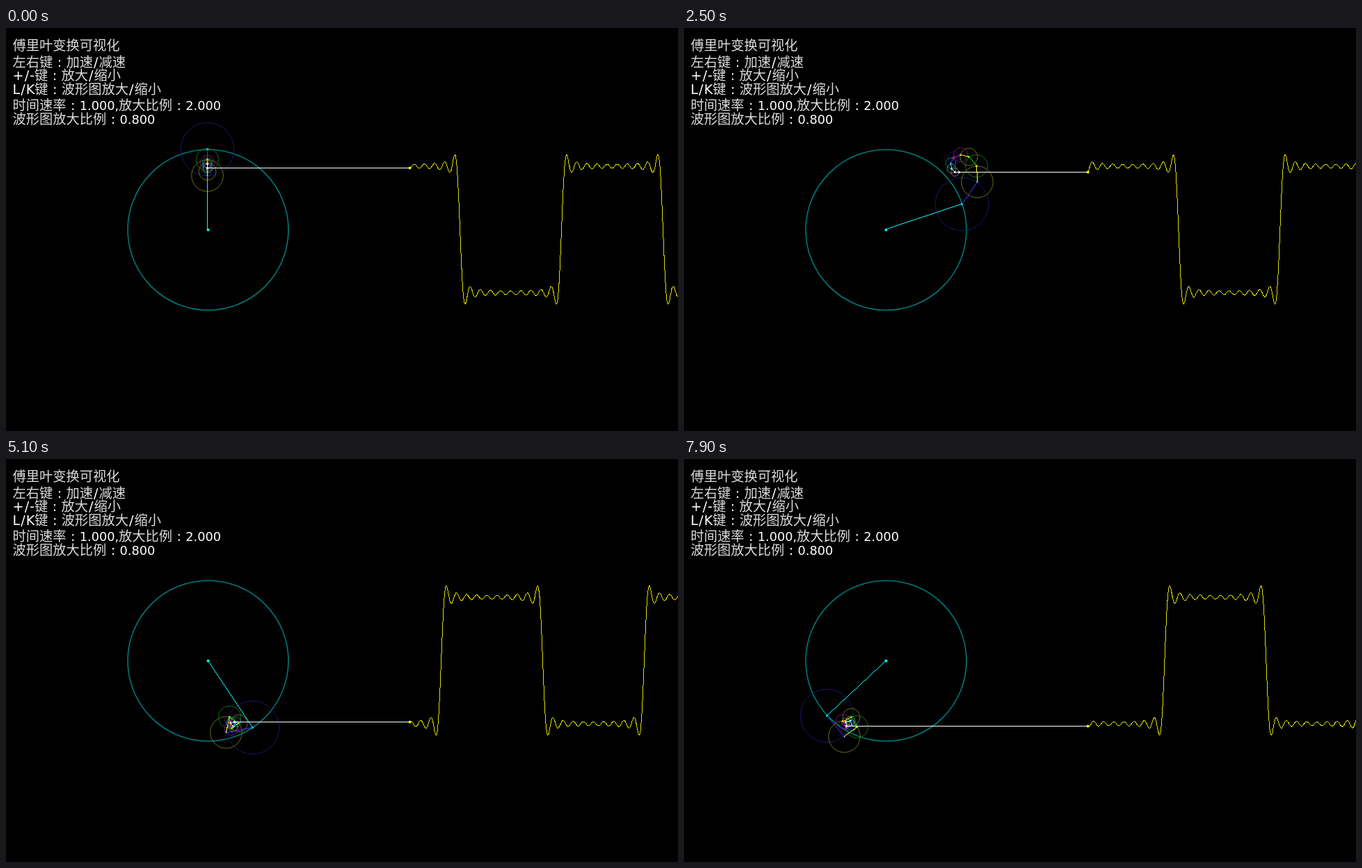
An HTML page with a canvas that plays this animation: 966x580 px, repeating every 8000 ms.

```html
<!DOCTYPE html>
<html lang="zh-CN">
<head>
<meta charset="utf-8">
<style>
html, body { margin: 0; width: 966px; height: 580px; overflow: hidden; background: #000; }
canvas { display: block; }
</style>
</head>
<body>
<canvas id="stage" width="966" height="580"></canvas>
<script>
const ctx = document.getElementById('stage').getContext('2d');
const W = 966, H = 580;
const CENTER = 290, R = 115.9, WAVE_X = 580, WAVE_SCALE = 46.45;
const FRAME = 100, FRAMES = 80, STEP = 0.0502, START_ANGLE = Math.PI / 2 + 0.008;

// Line colour and dim circle colour of each harmonic
const CYAN = ['#0ff', '#007878'], BLUE = ['#3c3cff', '#17176e'], YELLOW = ['#ff0', '#6e6e1a'],
  GREEN = ['#0f0', '#146e14'], MAGENTA = ['#f0f', '#6e146e'], WHITE = ['#fff', '#787878'];
const COLORS = [CYAN, BLUE, YELLOW, GREEN, YELLOW, MAGENTA, BLUE, CYAN, WHITE, WHITE];

const ROWS = [
  [32, '傅里叶变换可视化'],
  [55.5, '左右键:加速/减速'],
  [75, '+/-键:放大/缩小'],
  [94.5, 'L/K键:波形图放大/缩小'],
  [118, '时间速率:1.000,放大比例:2.000'],
  [137.5, '波形图放大比例:0.800']
];
const PADDING = { ':': 6.4, '/': 1 };

function drawText(y, text) {
  let x = 9.5;
  for (const c of text) {
    const wide = c > '\u00ff', pad = PADDING[c] || 0;
    ctx.fillStyle = wide ? '#dcdcdc' : '#fff';
    ctx.font = wide
      ? '300 19.25px "Noto Sans CJK SC Light", "Noto Sans CJK SC", sans-serif'
      : (/[\d.,]/.test(c) ? 17.7 : 19.25) + 'px "DejaVu Sans", sans-serif';
    ctx.fillText(c, x + pad, y);
    x += ctx.measureText(c).width + 2 * pad;
  }
}

// Hard-edged line, one pixel wide
function line(x0, y0, x1, y1, color) {
  const n = Math.ceil(Math.max(Math.abs(x1 - x0), Math.abs(y1 - y0), 1));
  ctx.fillStyle = color;
  for (let i = 0; i <= n; i++)
    ctx.fillRect(Math.floor(x0 + (x1 - x0) * i / n), Math.floor(y0 + (y1 - y0) * i / n), 1, 1);
}

function arc(x, y, r) {
  ctx.beginPath();
  ctx.arc(Math.floor(x) + 0.5, Math.floor(y) + 0.5, r, 0, 2 * Math.PI);
}

function circle(x, y, r, color, width) {
  arc(x, y, r - 0.4);
  ctx.strokeStyle = color;
  ctx.lineWidth = width;
  ctx.stroke();
}

function dot(x, y, r, color) {
  arc(x, y, r);
  ctx.fillStyle = color;
  ctx.fill();
}

// Centre followed by the end of each arm
function chain(theta) {
  const points = [[CENTER, CENTER]];
  COLORS.forEach((_, i) => {
    const n = 2 * i + 1, [x, y] = points[i];
    points.push([x + R / n * Math.cos(n * theta), y - R / n * Math.sin(n * theta)]);
  });
  return points;
}

function drawWave(theta) {
  const point = angle => [WAVE_X + angle * WAVE_SCALE, chain(theta + angle)[COLORS.length][1]];
  const da = STEP / 3, end = (W - WAVE_X) / WAVE_SCALE;
  for (let a = 0; a < end; a += da)
    line(...point(a), ...point(a + da), '#dcdc00');
}

function draw(step) {
  const theta = START_ANGLE - STEP * step;
  const points = chain(theta);
  ctx.fillStyle = '#000';
  ctx.fillRect(0, 0, W, H);
  ROWS.forEach(row => drawText(...row));
  drawWave(theta);

  COLORS.forEach(([, dim], i) => circle(...points[i], R / (2 * i + 1), dim, i ? 1 : 1.6));
  dot(CENTER, CENTER, 2, CYAN[0]);
  COLORS.forEach(([bright], i) => {
    line(...points[i], ...points[i + 1], bright);
    dot(...points[i + 1], 1.5, bright);
  });

  const [x, y] = points[COLORS.length];
  line(x, y, WAVE_X, y, '#fff');
  dot(WAVE_X, y, 2, '#ff0');
}

const start = performance.now();
function tick() {
  draw(Math.floor((performance.now() - start) / FRAME) % FRAMES);
  requestAnimationFrame(tick);
}
tick();
</script>
</body>
</html>
```
